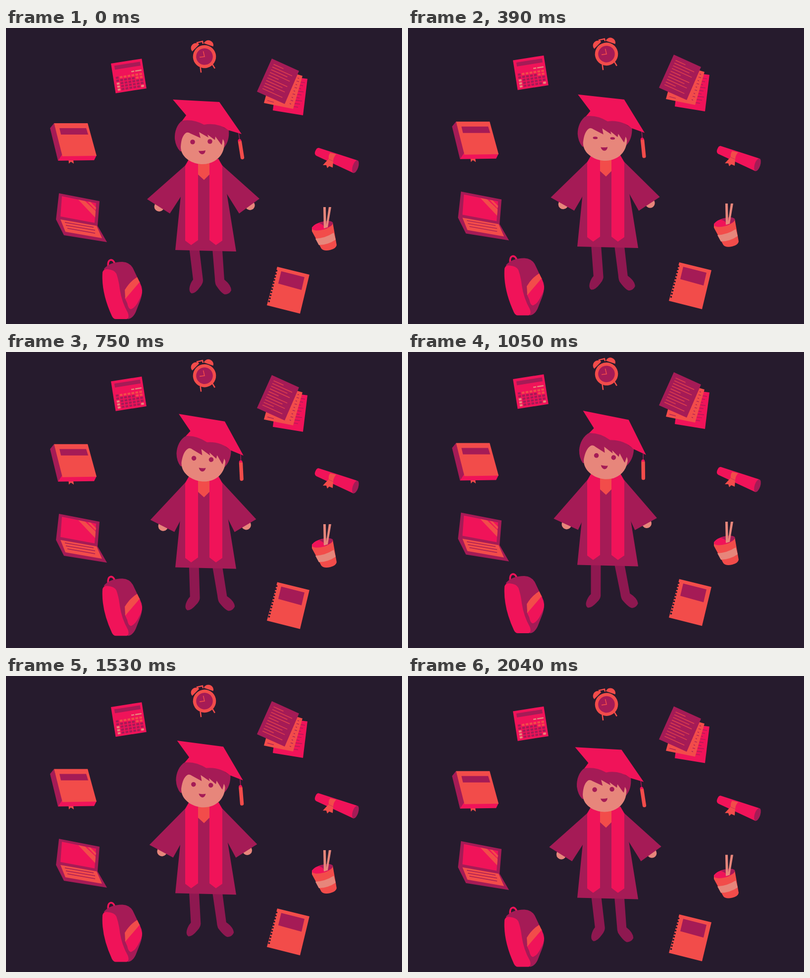
Write an HTML page that moves like this. It is 800 px wide and 600 px high and loops after 2070 ms.

```html
<!DOCTYPE html>
<html lang="en">
<head>
<meta charset="utf-8">
<title>Graduate</title>
<style>
  html, body { margin: 0; width: 100%; height: 100%; overflow: hidden; background: #261b2d; }
  svg { display: block; width: 100vw; height: 100vh; }
  .pink { fill: #f01359; }
  .plum { fill: #a51b56; }
  .leg { fill: #8e1850; }
  .coral { fill: #f24c4a; }
  .skin { fill: #e7867b; }
  .night { fill: #261b2d; }
  .line { fill: none; stroke: #a51b56; }
  .line.coral { fill: none; stroke: #f24c4a; }
  .line.pink { fill: none; stroke: #f01359; }
</style>
</head>
<body>
<svg viewBox="0 0 800 600">
  <g data-rise="17.2" transform-origin="0 0">
    <g id="calculator" transform="translate(212 72) rotate(-9)">
      <path class="pink" d="M0 0H63V61H0Z"/>
      <path class="plum" d="M6 5.5H58.5V13.5H6Z"/>
      <path class="skin" d="M38 21.5h6v2.5h-6zM46 21.5h13v2.5h-13z"/>
    </g>
  </g>

  <g data-rise="13.7">
    <g transform="translate(401 58) rotate(-13)">
      <path class="line coral" stroke-width="2.5" d="M-7 -27L-8 -31H3L3 -26M-13 19L-14 30M12 19L15 28"/>
      <path class="coral" d="M-10 0A10 9.5 0 0 1 10 0Z" transform="rotate(-32) translate(0 -25)"/>
      <path class="coral" d="M-10 0A10 9.5 0 0 1 10 0Z" transform="rotate(32) translate(0 -25)"/>
      <circle class="coral" r="23.3"/>
      <circle class="plum" r="16.8"/>
      <path class="line coral" stroke-width="1.6" d="M0 -11V0L-10 -1"/>
    </g>
  </g>

  <g data-rise="21.2">
    <path class="pink" d="M548 95L609 103L600 177L539 167Z"/>
    <path class="line" id="backLines" stroke-width="1.2"/>
    <path class="coral" d="M541 80L599 97L580 164L521 152Z"/>
    <path class="line" id="middleLines" stroke-width="1.2"/>
    <path class="plum" d="M537 62L592 87L563 154L507 129Z"/>
    <path class="line coral" id="frontLines" stroke-width="1.5" opacity=".8" transform="translate(537 62) rotate(24.4)"/>
  </g>

  <g data-rise="10.1">
    <path class="pink" d="M632 243L709 268L702 294L627 259Q622 256 625 249Q628 242 632 243Z"/>
    <ellipse class="plum" rx="5.7" ry="13.3" transform="translate(706 281) rotate(18)"/>
    <path class="coral" d="M655 253L667 256Q661 262 661 271L660 283L653 280L649 284L647 278L640 278L652 265Q651 258 655 253Z"/>
    <path class="line" stroke-width="1" opacity=".5" d="M652 266L661 270"/>
  </g>

  <g data-rise="19.2">
    <path class="coral" d="M618 404L618 412L637 447Q642 453 655 450Q667 447 668 440L660 394Z"/>
    <ellipse class="pink" rx="21.5" ry="8" transform="translate(639 401) rotate(-15)"/>
    <path class="plum" d="M632 396Q649 388 659 393Q664 399 646 406Q640 397 632 396Z"/>
    <path class="skin" d="M625 427Q645 426 662 415L666 429Q650 440 632 440Z"/>
    <path class="skin" d="M641 363H646L647 405L642 406ZM652 363H657L650 404L646 405Z"/>
  </g>

  <g data-rise="24.2">
    <path class="coral" d="M548 484L613 500L594 579L527 562Z"/>
    <path class="plum" d="M556 493L603 505L597 531L550 518Z"/>
    <g id="spiral" class="night"></g>
  </g>

  <g data-rise="20.2">
    <path class="line pink" stroke-width="3.6" d="M207 488Q204 471 212 470Q219 470 221 484"/>
    <path class="plum" d="M198 488Q210 474 235 474Q251 475 257 488L274 524Q277 537 271 553L262 576Q256 589 246 590L220 560Z"/>
    <path class="pink" d="M195 495Q197 488 205 489Q219 490 223 498Q228 512 230 530Q234 556 246 577Q250 587 244 590H222Q217 590 214 584Q192 536 195 495Z"/>
    <path class="pink" d="M240 547L270 514L275 532Q275 541 269 551Q261 568 252 570Q247 569 245 558Z"/>
    <path class="coral" d="M240 531Q250 514 265 505L270 515L241 549Z"/>
  </g>

  <g data-rise="9.6">
    <path class="plum" d="M107 335L189 351L185 401L204 434L117 420L101 388Z"/>
    <path class="pink" d="M113 341L182 355L179 395L110 382Z"/>
    <path class="coral" d="M146 348L160 351L181 371L180 384ZM165 352L171 353L182 364L181 369Z"/>
    <path class="coral" d="M110 388L183 401L194 426L120 413Z"/>
    <path class="line" stroke-width="1.5" d="M119 394L177 404M121 400L180 410M124 406L180 416"/>
  </g>

  <g data-rise="8.6">
    <path class="coral" d="M126 262H135L137 275L131 271L127 275Z"/>
    <path class="plum" d="M97 193L89 203L105 269L115 258Z"/>
    <path class="pink" d="M105 269L113 257L183 258L178 268Z"/>
    <path class="coral" d="M97 193H165L183 259L114 260Z"/>
    <path class="plum" d="M108 203H162L166 216H111Z"/>
  </g>

  <g data-rise="18.8">
    <path class="leg" data-turn="7.1" data-pivot="380 440" d="M369 436H389L398 511Q398 518 392 525Q383 538 375 538Q369 535 371 525Q373 516 378 510Z"/>
    <path class="leg" data-turn="-6.8" data-pivot="427 447" d="M416 436H436L441 510Q455 521 455 532Q451 540 442 540Q435 538 424 521Q422 516 422 508Z"/>

    <path class="plum" d="M369 267H430L438 280L447 341L465 453L342 450L353 341L361 280Z"/>
    <g data-turn="-7.5" data-pivot="361 280">
      <circle class="skin" cx="309.5" cy="362" r="10"/>
      <path class="plum" d="M364 277L285 347L331 376L364 325Z"/>
    </g>
    <g data-turn="7.5" data-pivot="438 280">
      <circle class="skin" cx="493" cy="359.5" r="9.7"/>
      <path class="plum" d="M435 277L512 346L471 376L436 320Z"/>
    </g>
    <path class="coral" d="M388 265H411V297L400 308L388 297Z"/>
    <path class="pink" d="M370 265L388 270V430L374 440L362 431V280ZM429 265L411 270V430L424 440L437 431V280Z"/>

    <g data-turn="8.5" data-pivot="397 254">
      <path class="plum" d="M357 187C345 195 340 211 341 225Q343 241 352 250L440 243Q452 229 450 207L400 180Z"/>
      <path class="skin" d="M353 241Q354 220 363 213Q367 210 373 214L393 223L390 211L409 222L407 216L422 227L423 220L434 235L436 237L438 225Q442 230 441 236C440 261 420 276 397 276C375 276 353 262 353 241Z"/>
      <ellipse class="plum eye" cx="377" cy="231" rx="4.8" ry="4.8"/>
      <ellipse class="plum eye" cx="412" cy="230" rx="4.8" ry="4.8"/>
      <path class="plum" d="M389 249Q396 250 403 248Q402 256 396 256Q391 255 389 249Z"/>
      <path class="pink" d="M337 145L431 150L476 215L449 207Q427 191 400 196Q378 184 356 188L364 177Z"/>
      <path class="line" stroke-width="1.5" d="M470 213L472 227"/>
      <path class="line coral" stroke-width="7.4" stroke-linecap="round" d="M472.5 231L477.5 262.5"/>
      <path class="pink" d="M468.5 230Q468 225 472 225Q475 225 475.5 229Z"/>
    </g>
  </g>
</svg>
<script>
const LOOP = 2070, HALF = LOOP / 2, STEP = 30;
const BLINK_AT = 333, BLINK_SPAN = 110;
const $ = id => document.getElementById(id);

function add(parent, tag, attrs) {
  const node = document.createElementNS("http://www.w3.org/2000/svg", tag);
  for (const name in attrs) node.setAttribute(name, attrs[name]);
  parent.append(node);
}

function keyColor(row, col) {
  if (row > 1 && col === 0 || row === 4 && col === 6) return "skin";
  if (row === 0 && col > 0 || row === 1 && col > 4) return "coral";
  return "plum";
}

for (let row = 0; row < 5; row++)
  for (let col = 0; col < 7; col++)
    add($("calculator"), "rect", {
      x: 5.2 + col * 8, y: 28.3 + row * 6.1, width: 5.6, height: 4.2, class: keyColor(row, col)
    });

for (let i = 0; i < 11; i++)
  add($("spiral"), "circle", { cx: 546.5 - i * 1.5, cy: 492 + i * 6.2, r: 1.9 });

const lines = (count, segment) => Array.from({ length: count }, (_, i) => segment(i)).join("");
$("frontLines").setAttribute("d", lines(10, i => `M8 ${9 + i * 6}H${[30, 52, 44, 52][i % 4]}`));
$("middleLines").setAttribute("d", lines(9, i => `M${589 - i * 2} ${101 + i * 6.5}l${i % 2 ? 5 : 3} 1.4`) + "M528 147l13 3.5");
$("backLines").setAttribute("d", lines(9, i => `M${592 - i * 1.8} ${109 + i * 6.2}L${604 - i - i % 3 * 3} ${111 + i * 6.2}`));

const risers = [...document.querySelectorAll("[data-rise]")];
const turners = [...document.querySelectorAll("[data-turn]")];
const eyes = [...document.querySelectorAll(".eye")];

function draw(time) {
  const t = Math.floor(time % LOOP / STEP) * STEP;
  const phase = t < HALF ? t : LOOP - t;
  const lift = phase / HALF;
  for (const el of risers)
    el.setAttribute("transform", `translate(0 ${-el.dataset.rise * lift})`);
  for (const el of turners)
    el.setAttribute("transform", `rotate(${el.dataset.turn * lift} ${el.dataset.pivot})`);
  const open = Math.min(1, Math.max(0.12, Math.abs(phase - BLINK_AT) / BLINK_SPAN));
  for (const eye of eyes) eye.setAttribute("ry", 4.8 * open);
}

const start = performance.now();
function frame() {
  draw(performance.now() - start);
  requestAnimationFrame(frame);
}
frame();
</script>
</body>
</html>
```
